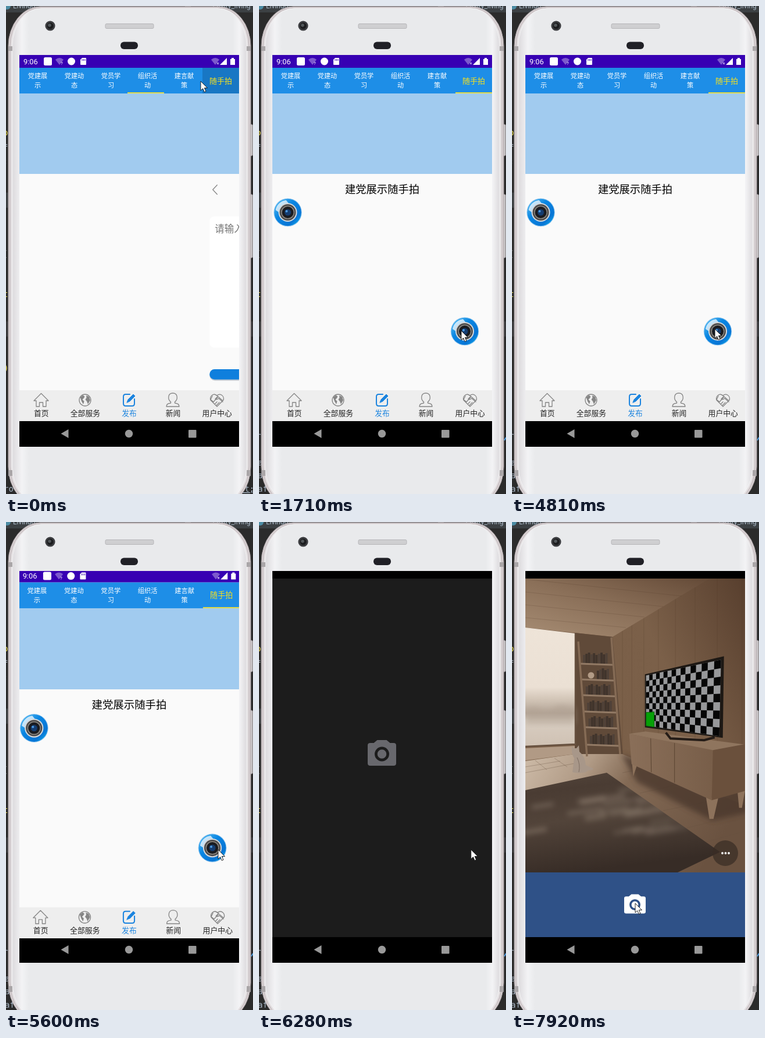
An HTML page that plays this animation: 425x837 px, repeating every 8000 ms.

```html
<!DOCTYPE html>
<html lang="zh-CN">
<head>
<meta charset="utf-8">
<style>
html, body { margin: 0; width: 100%; height: 100%; overflow: hidden; background: #2b2b2b; }
svg { display: block; width: 425px; height: 837px; }
text { font-family: Roboto, "Noto Sans CJK SC", "Noto Sans CJK", sans-serif; }
.mid { text-anchor: middle; }
.code text { font: 14px "DejaVu Sans Mono", monospace; }
.line { fill: none; stroke: #858585; stroke-width: 1.3; stroke-linejoin: round; stroke-linecap: round; }
</style>
</head>
<body>
<svg viewBox="0 0 425 837">
  <defs>
    <clipPath id="screen"><rect x="23" y="84" width="378" height="672"/></clipPath>
    <clipPath id="view"><rect x="23" y="97" width="378" height="504"/></clipPath>
    <clipPath id="pager"><rect x="23" y="288" width="378" height="371"/></clipPath>
    <clipPath id="carpet"><path d="M23 460l140-30 195 136-73 35H23z"/></clipPath>
    <filter id="soft" x="-20%" y="-20%" width="140%" height="140%"><feGaussianBlur stdDeviation="5"/></filter>
    <linearGradient id="blue" x1="0" y1="0" x2="1" y2="1">
      <stop stop-color="#62c4f5"/><stop offset=".4" stop-color="#0a86e2"/><stop offset=".75" stop-color="#0875d5"/><stop offset="1" stop-color="#12c0f4"/>
    </linearGradient>
    <linearGradient id="body"><stop stop-color="#dcdadd"/><stop offset=".04" stop-color="#f3f3f5"/><stop offset=".07" stop-color="#e9eaec"/><stop offset=".94" stop-color="#e9eaec"/><stop offset=".97" stop-color="#f3f3f5"/><stop offset="1" stop-color="#dcdadd"/></linearGradient>
    <linearGradient id="ceiling" x1="0" y1="1" x2="1" y2="0"><stop stop-color="#a78d74"/><stop offset=".5" stop-color="#8a6f58"/><stop offset="1" stop-color="#644a37"/></linearGradient>
    <linearGradient id="wall" x1="0" y1=".6" x2="1" y2="0"><stop offset=".3" stop-color="#7a5f48"/><stop offset=".6" stop-color="#7b6049"/><stop offset="1" stop-color="#583f2e"/></linearGradient>
    <linearGradient id="window" x1="0" y1="0" x2="0" y2="1"><stop stop-color="#eee4d8"/><stop offset=".5" stop-color="#ebe0d4"/><stop offset=".6" stop-color="#d3c6b8"/><stop offset=".72" stop-color="#b5a698"/><stop offset=".78" stop-color="#d8cdc1"/><stop offset="1" stop-color="#cfc1b3"/></linearGradient>
    <linearGradient id="floor" x1="0" y1="0" x2="1" y2=".35"><stop stop-color="#cdbba8"/><stop offset=".28" stop-color="#b09a85"/><stop offset=".48" stop-color="#836a55"/><stop offset="1" stop-color="#6a5240"/></linearGradient>
    <linearGradient id="rug" x1="0" y1="0" x2=".25" y2="1"><stop stop-color="#54463c"/><stop offset=".2" stop-color="#4a3c33"/><stop offset=".5" stop-color="#52443a"/><stop offset="1" stop-color="#372c26"/></linearGradient>
    <linearGradient id="front"><stop stop-color="#8a6f59"/><stop offset="1" stop-color="#785e49"/></linearGradient>
    <g id="ball">
      <circle r="24.3" fill="#9fcdf0"/><circle r="23.3" fill="url(#blue)"/>
      <path d="M-21-4A21 21 0 0 1-3-21L2-15Q-12-13-15 0Z" fill="#fff" opacity=".72"/>
      <circle r="16" fill="#d5d8db"/><circle r="14" fill="#4b4a4a"/><circle r="11.5" fill="#8b8780"/>
      <circle r="10" fill="#191b20"/><circle r="5.5" fill="#143c70"/><circle cx="-2" cy="-2" r="2" fill="#4c9ae0"/>
    </g>
    <path id="camera" fill-rule="evenodd" d="M-20-19H-14L-8-24H8L14-19H20Q24.5-19 24.5-15V16Q24.5 20 20 20H-20Q-24.5 20-24.5 16V-15Q-24.5-19-20-19ZM-12.5 0A12.5 12.5 0 0 0 12.5 0A12.5 12.5 0 0 0-12.5 0M-7.8 0A7.8 7.8 0 0 1 7.8 0A7.8 7.8 0 0 1-7.8 0"/>
    <g id="wifi"><path d="M0 3Q7-3 14 3L7 12Z" fill="#fff" opacity=".35"/></g>
  </defs>

  <!-- editor behind the phone -->
  <g class="code">
    <rect width="425" height="11" fill="#3c4043"/>
    <rect y="320" width="10" height="26" fill="#3c3f41"/><rect y="541" width="425" height="26" fill="#3a3a3c"/>
    <circle cx="2" cy="0" r="6" fill="#4c8ca4"/>
    <g fill="#a9b7c6">
      <text x="12" y="4" style="font:12px Roboto,sans-serif">Livingd</text>
      <text x="356" y="4" style="font:12px Roboto,sans-serif">ctivity_living</text>
      <text x="-5" y="248">f</text><text x="-5" y="271">:</text><text x="-5" y="430" fill="#777">[</text>
    </g>
    <text x="-5" y="222" fill="#e8d84a">o</text><text x="-5" y="499" fill="#e8d84a">t</text>
    <g id="codeA"><text x="-4" y="626" fill="#e8d84a">)</text><text x="-4" y="833" fill="#a9b7c6">ro:</text><text x="402" y="833" fill="#a9b7c6" text-decoration="underline">et;</text></g>
    <g id="codeB" fill="#a9b7c6"><text x="-5" y="742">r</text><text x="-2" y="788">a</text><text x="-2" y="810">a</text><text x="-2" y="833">af</text><path d="M422 745l3-5" stroke="#4a9ae0" stroke-width="2"/></g>
  </g>

  <!-- phone -->
  <g fill="#c9c5c7" stroke="#8a8688" stroke-width=".8">
    <rect x="418" y="203" width="6.5" height="54" rx="2"/><rect x="418" y="323" width="6.5" height="109" rx="2"/>
  </g>
  <rect x="308" width="10" height="5" fill="#77777a"/>
  <rect x="4" y="1" width="417" height="857" rx="55" ry="68" fill="#d9d2d4" stroke="#aaa2a5"/>
  <rect x="7" y="3" width="411" height="853" rx="53" ry="66" fill="#e3dfe1" stroke="#bcb2b5"/>
  <rect x="11" y="4" width="403" height="850" rx="50" ry="64" fill="url(#body)" stroke="#f5f5f6"/>
  <path d="M4 69h7v8h-7zM414 69h7v8h-7zM4 796h7v10h-7zM414 796h7v10h-7z" fill="#aaa6a8"/>
  <circle cx="76" cy="34" r="8.6" fill="#3c3d40"/><circle cx="76" cy="34" r="5.5" fill="#1b1c1e"/><circle cx="75" cy="33" r="2.8" fill="#53585b"/>
  <rect x="171" y="30.500" width="83" height="8" rx="2" fill="#cfcfd1" stroke="#b5b5b8"/>
  <rect x="197" y="61.500" width="30" height="12.500" rx="6" fill="#202026"/>

  <g clip-path="url(#screen)">
    <rect x="23" y="84" width="378" height="672"/>
    <g id="app">
      <rect x="23" y="84" width="378" height="628" fill="#fafafa"/>
      <rect x="23" y="84" width="378" height="22" fill="#3700b3"/>
      <g fill="#fff">
        <text x="30" y="99.500" font-size="12.800">9:06</text>
        <rect x="65" y="88" width="14" height="14" rx="2.500"/>
        <use href="#wifi" x="85" y="89"/><text x="94" y="101" font-size="8">?</text>
        <circle cx="112.500" cy="95" r="6.500"/>
        <path d="M131 89h6q1 0 1 1v10q0 1-1 1h-8q-1 0-1-1v-8z"/><path d="M131 91v3M133.500 91v3M136 91v3" stroke="#3700b3"/>
        <use href="#wifi" x="353" y="89"/><path d="M363 97l3 3m0-3l-3 3" stroke="#fff"/>
        <path d="M380 89v12h-12zM386 91h2v-2h4v2h2v10h-8z"/>
      </g>
      <rect x="23" y="106" width="378" height="44" fill="#1e8ee7"/>
      <rect id="press" x="338" y="106" width="63" height="44" fill="#1877c4"/>
      <g id="tabs" class="mid" fill="#fff" font-size="11.200"></g>
      <text class="mid" x="369.500" y="132.500" font-size="13" fill="#f7e01c">随手拍</text>
      <rect id="bar" y="148" width="63" height="2" fill="#e5dc45"/>
      <rect x="23" y="150" width="378" height="138" fill="#a1cbef"/>
      <g clip-path="url(#pager)">
        <g id="pages">
          <g transform="translate(401)">
            <path d="M25 307l-7.500 8 7.500 8" class="line"/>
            <text class="mid" x="189" y="321" font-size="18.300">建言献策</text>
            <rect x="12" y="361" width="354" height="225" rx="8" fill="#fff"/>
            <text x="21" y="388" font-size="16.500" fill="#757575">请输入内容</text>
            <rect x="12" y="624.500" width="354" height="18" rx="9" fill="#b9c4cf"/>
            <rect x="12" y="623" width="354" height="17.500" rx="8.500" fill="#0f7fdd"/>
          </g>
          <g transform="translate(756)">
            <text class="mid" x="212" y="320.500" font-size="18.300">建党展示随手拍</text>
            <use href="#ball" x="49.500" y="354"/><use href="#ball" x="354" y="558"/>
          </g>
        </g>
      </g>
      <rect x="23" y="659" width="378" height="53" fill="#eee"/>
      <g class="line">
        <path d="M48 677l12.500-12.500L73 677h-4v10h-5.500v-7h-6v7H52v-10z"/>
        <circle cx="136" cy="676" r="10"/>
        <path d="M127.500 671l5-3.500 3 2.500-2 3-2 2 3 3-1.500 5-3-5zM138 668l5 2 2 6-4 7-2-5-2.500-3 2-3z" fill="#858585" stroke="none"/>
        <path d="M287 664c9 0 9 11 3.500 15v2c6 1 7 2 7.500 6h-22c.5-4 1.500-5 7.500-6v-2c-5.500-4-5.500-15 3.500-15z"/>
        <path d="M363 687l-11-11c-2-6 4-13 11-8 7-5 13 2 11 8zM355 669l-3 6 5 4 8-9 8 7M359 683l4-4m-1 6l5-5m-3-10l-4 4q2 2 6-1l7 6m-14-13l5 3"/>
      </g>
      <g fill="none" stroke="#1b84df" stroke-width="2" stroke-linecap="round">
        <path d="M213 666h-7q-4 0-4 4v12q0 4 4 4h11q4 0 4-4v-8"/><path d="M208 680l2-5 9-9 3 3-9 9z" fill="#1b84df" stroke-width="1"/>
      </g>
      <g id="labels" class="mid" font-size="12.800"></g>
      <rect x="23" y="712" width="378" height="60"/>
    </g>
    <rect id="dim" x="23" y="84" width="378" height="672" opacity="0"/>

    <g id="cam">
      <rect x="23" y="84" width="378" height="672"/>
      <rect id="splash" x="23" width="378" fill="#1c1c1c"/>
      <g id="photo">
        <g clip-path="url(#view)">
          <rect x="23" y="97" width="378" height="504" fill="url(#wall)"/>
          <path d="M23 97H340L298 122 173 197 108 190 23 181z" fill="url(#ceiling)"/>
          <path id="boards" fill="none" stroke="#4b3526" stroke-opacity=".2"/>
          <path d="M108 190l65 7 18 205-83 8z" fill="#604a39"/>
          <path d="M23 181l85 10v190l-85 4z" fill="url(#window)"/>
          <path d="M23 322q12-8 25-2t25-2 35 2v26H23z" fill="#b0a193" opacity=".6" filter="url(#soft)"/>
          <path d="M109 190v193M23 385l86-4" stroke="#66503f" stroke-width="2.500"/>
          <path d="M23 410l85-12 82 0 215 90v120H23z" fill="url(#floor)"/>
          <path d="M23 388l85-4v14l-85 11z" fill="#b19a85"/>
          <path d="M23 430l85-16M23 420l60-10M60 425l-20-16M95 420l-22-15M190 430l80-15M220 465l90-20M260 495l75-15M300 525l100-25M330 550l71-20" stroke="#665140" stroke-opacity=".35"/>
          <path d="M188 398l20 8 137 64 60-18v46l-60 14-130-66z" fill="#46342a" opacity=".75" filter="url(#soft)"/>
          <path d="M23 460l140-30 195 136-73 35H23z" fill="url(#rug)"/>
          <g clip-path="url(#carpet)"><g id="streaks" filter="url(#soft)" fill="#a39383"></g></g>
          <g id="shelf"></g>
          <path d="M114 205l15 197M171 198l15 200" stroke="#856b55" stroke-width="3.500"/>
          <path d="M103 384l3 4 5 0 4-5 1 11q10 8 11 23l13 6q-1 3-9 3l-4 3q-12 3-23 0 2-16 3-24-5-6-4-21z" fill="#a89789"/>
          <path d="M112 404q6 12 3 25" fill="none" stroke="#7d6c60"/>
          <g id="room">
            <path d="M208 416l8 3-6 18zM335 472l21 3-8 35h-7zM389 460l14-3-6 34h-5z" fill="#8d725b"/>
            <path d="M203 364l28-4 175 23-59 10z" fill="#8f755e"/>
            <path d="M203 364l144 28-2 86-138-62z" fill="url(#front)"/>
            <path d="M347 392l59-11v80l-61 17z" fill="#6a503c"/>
            <path d="M240 372l1 58M281 380l0 68" stroke="#594431"/>
            <path d="M266 362l8 10 58 3 18-5" fill="none" stroke="#241c17" stroke-width="4"/>
            <path d="M230 262l136-31-2 140-134-18z" fill="#1d1814"/>
            <path d="M232 264l129-27-3 131-126-18z" fill="#97989a"/>
            <path id="checks" fill="#060606"/>
            <path d="M232 327.500l14-1v26l-14-2z" fill="#07a007" stroke="#0b5d0b"/>
          </g>
          <circle cx="367" cy="568" r="22" fill="#3a2d25" opacity=".72"/>
          <path d="M362 568h.01M367.500 568h.01M373 568h.01" stroke="#fff" stroke-width="3.800" stroke-linecap="round"/>
        </g>
        <rect id="panel" x="23" y="601" width="378" height="111"/>
        <use href="#camera" transform="translate(211.500 656.500) scale(.755)" fill="#fff"/>
      </g>
      <use id="logo" href="#camera" x="211.500" y="398" fill="#68686d"/>
    </g>
    <path d="M107.500 726v15l-13-7.500z" fill="#999"/><circle cx="211.500" cy="733.500" r="6.700" fill="#999"/><rect x="314" y="727" width="13.500" height="13.500" rx="1" fill="#999"/>
  </g>
  <path id="cursor" d="M0 0V16L3.700 12.600 6.300 18.600 9 17.400 6.400 11.600H11.500Z" fill="#fff" stroke="#111" stroke-width=".9"/>
</svg>
<script>
const $ = id => document.getElementById(id);
const set = (id, name, value) => $(id).setAttribute(name, value);
const clamp = x => Math.max(0, Math.min(1, x));
const mix = (a, b, p) => a + (b - a) * p;

$('tabs').innerHTML = ['党建展示', '党建动态', '党员学习', '组织活动', '建言献策'].map((s, i) =>
  [s.slice(0, 3), s[3]].map((row, j) => `<text x="${54.5 + 63 * i}" y="${124 + 16 * j}">${row}</text>`).join('')).join('');
$('labels').innerHTML = ['首页', '全部服务', '发布', '新闻', '用户中心'].map((s, i) =>
  `<text x="${60.8 + 75.6 * i}" y="703" fill="${i == 2 ? '#1b84df' : '#222'}">${s}</text>`).join('');

// wall boards and ceiling seams
let d = '';
for (let i = 0; i < 8; i++) {
  const x = 190 + i * i * 2.2 + i * 14;
  d += `M${x} ${Math.max(97, 187 - (x - 190) * .6)}V420`;
  if (i % 2) d += `M23 ${175 - i * 11}L${180 + i * 16} ${190 - i * 9}`;
}
set('boards', 'd', d);

// shelf rows with books
let shelf = '';
[243, 270, 297, 325, 352, 382].forEach((y, i) => {
  const left = 117 + i * 2.4, right = 173 + i * 2.3;
  for (let k = 0; k < 10; k++) {
    const h = 15 + (k * 7 + i * 5) % 5;
    if (i != 1 || k > 4) shelf += `<rect x="${left + 5 + k * 4.3}" y="${y - h}" width="3.9" height="${h}" fill="${k % 3 ? '#40342c' : '#4f4138'}"/>`;
  }
  if (i == 1) shelf += `<circle cx="136" cy="${y - 7}" r="5.5" fill="#b29b86"/>`;
  shelf += `<path d="M${left} ${y}L${right} ${y + 2}" stroke="#927a65" stroke-width="3"/>`;
});
$('shelf').innerHTML = shelf;

// sunlight streaks on the rug, strongest near the window
let seed = 7;
const random = () => (seed = seed * 16807 % 2147483647) / 2147483647;
let streaks = '';
for (let i = 0; i < 26; i++) {
  const x = 15 + random() * 240, y = 452 + random() * 85;
  streaks += `<rect x="${x}" y="${y}" width="${30 + random() * 50}" height="${5 + random() * 7}" opacity="${(.5 - x / 700).toFixed(2)}" transform="rotate(-9 ${x} ${y})"/>`;
}
$('streaks').innerHTML = streaks;

// checkerboard seen in perspective
const cols = 16, rows = 9;
const at = (c, r) => {
  const u = c / cols, p = u / (1.5 - .5 * u);
  const y = mix(mix(264, 237, p), mix(350, 368, p), r / rows);
  return `${mix(232, mix(361, 358, r / rows), p).toFixed(1)} ${y.toFixed(1)}`;
};
d = '';
for (let c = 0; c < cols; c++) for (let r = 0; r < rows; r++)
  if ((c + r) % 2) d += `M${at(c, r)}L${at(c + 1, r)}L${at(c + 1, r + 1)}L${at(c, r + 1)}Z`;
set('checks', 'd', d);

// time, x, y of the pointer tip
const path = [[0, 335, 129], [300, 335, 129], [850, 342, 495], [930, 342, 502], [1080, 348, 557], [2240, 348, 557], [2410, 349, 554],
  [4810, 349, 554], [5200, 365, 562], [6280, 365, 562], [6590, 300, 545], [6750, 247, 523], [7370, 213, 662], [7450, 212, 654], [8000, 212, 654]];
function pointer(t) {
  const i = path.findIndex(k => k[0] > t), a = path[i - 1], b = path[i];
  const p = (t - a[0]) / (b[0] - a[0]);
  return [mix(a[1], b[1], p), mix(a[2], b[2], p)];
}
const step = (t, list, first) => list.reduce((v, [at, next]) => t >= at ? next : v, first);
const hold = (t, from, gap) => t < from ? 0 : from + Math.floor((t - from) / gap) * gap;
const zoom = (id, s, cy) => set(id, 'transform', `translate(212 ${cy}) scale(${s}) translate(-212 ${-cy})`);
const show = (id, on) => set(id, 'display', on ? 'inline' : 'none');

function draw(t) {
  const q = hold(t, 80, 77);
  const slide = 1 - (1 - clamp((q + 10.3) / 600)) ** 5;
  set('pages', 'transform', `translate(${-756 * slide})`);
  const b = clamp(q / 300);
  set('bar', 'x', mix(209, 338, b * b * (3 - 2 * b)));
  set('press', 'opacity', 1 - clamp((q - 80) / 350));
  show('codeA', t < 1400);
  show('codeB', t >= 1400);

  zoom('app', step(t, [[5520, 1.003], [5600, 1.0075], [5750, 1.035], [5830, 1.045]], 1), 420);
  set('dim', 'opacity', step(t, [[5750, .15], [5830, .22]], 0));
  show('cam', t >= 5750);
  zoom('cam', step(t, [[5830, .9845], [5980, .996], [6060, 1]], .95), 408);
  const top = t < 6060 ? 84 : 97;
  set('splash', 'y', top);
  set('splash', 'height', 712 - top);
  show('photo', t >= 6590);
  set('logo', 'opacity', 1 - clamp((t - 6510) / 160));
  const sway = clamp((t - 6750) / 700);
  set('room', 'transform', `translate(${-1.3 * sway} ${-.8 * sway})`);
  const flash = step(t, [[7770, .35], [7850, .7], [7920, 1]], 0);
  set('panel', 'fill', `rgb(${[[28, 47], [28, 81], [28, 135]].map(c => Math.round(mix(...c, flash)))})`);
  set('cursor', 'transform', `translate(${pointer(t)})`);
}
function loop() {
  draw(performance.now() % 8000);
  requestAnimationFrame(loop);
}
loop();
</script>
</body>
</html>
```
